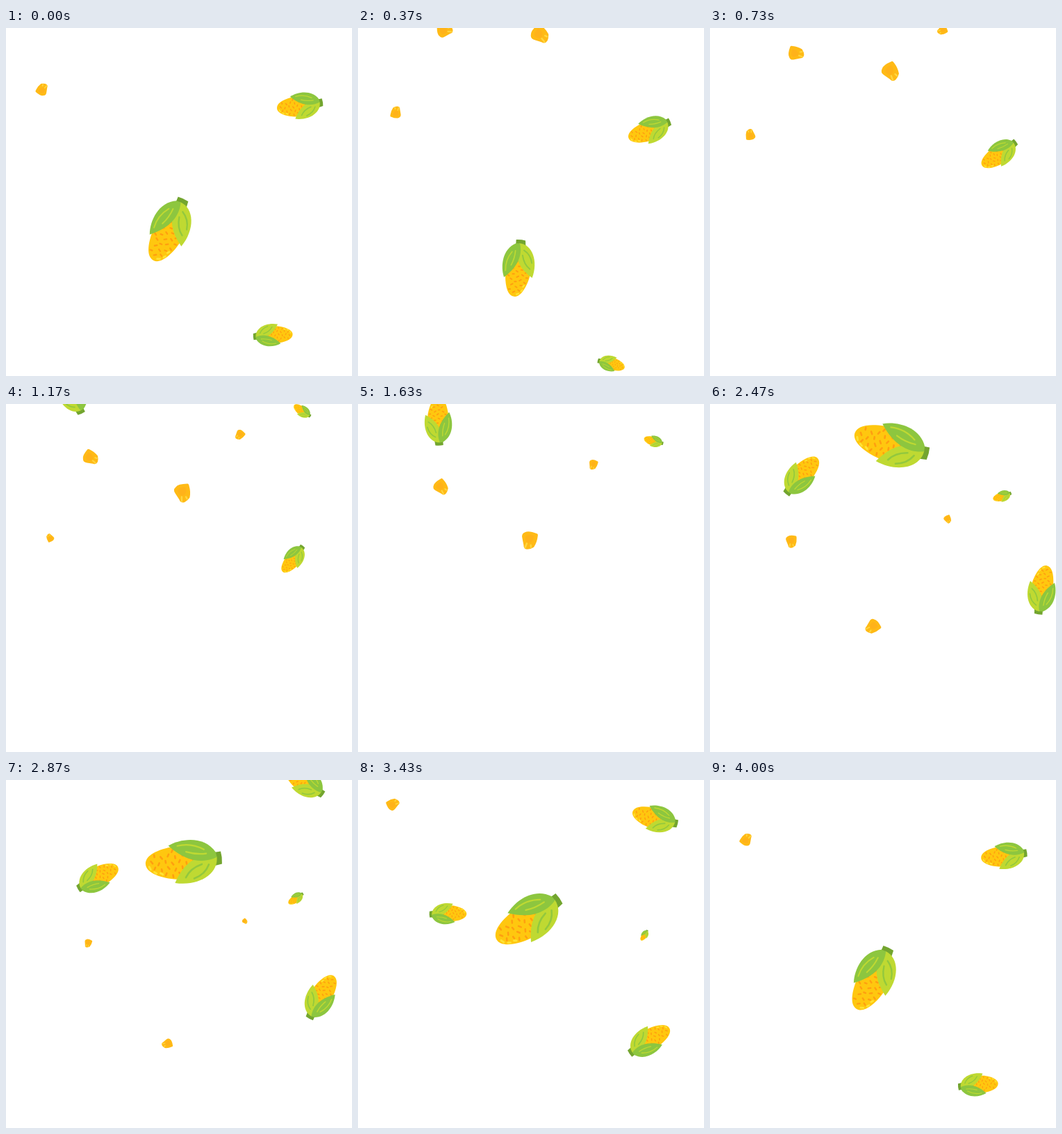
Write an HTML page with a canvas that moves like this. It is 498 by 500 pixels and loops after 4.03 s.

```html
<!DOCTYPE html>
<html>
<head>
<meta charset="utf-8">
<style>
html, body { margin: 0; width: 100%; height: 100%; overflow: hidden; background: #fff; }
canvas { display: block; }
</style>
</head>
<body>
<canvas id="stage" width="498" height="500"></canvas>
<script>
const ctx = document.getElementById('stage').getContext('2d');
const LOOP = 4030, LIFE = 2640;

// end: time it vanishes; y: height there; v: fall in px/ms;
// x: cubic Bezier drift; turn: angle at the end; spin: degrees/ms
const corns = [
  { end: 4735, y: 395, v: .149, x: [263, 263, 228, 229], size: 110, turn: -98, spin: -.051 },
  { end: 4470, y: 490.3, v: .1117, x: [516, 466, 405, 361], size: 71, turn: 200, spin: .049 },
  { end: 3560, y: 235.3, v: .0943, x: [426, 428, 419, 411], size: 28.5, turn: -61, spin: -.0405 },
  { end: 5460, y: 247.4, v: .0949, x: [429, 430, 415, 412], size: 67, turn: -60, spin: -.038 },
  { end: 3810, y: 227.5, v: .093, x: [94, 147, 130, 128], size: 69.5, turn: 200, spin: .05 }
];
const kernels = [
  { end: 5380, y: 208, v: .0888, x: [51, 49, 53, 66], size: 17, turn: -125, spin: -.05 },
  { end: 2910, y: 238.2, v: .0924, x: [125, 125, 113, 118], size: 21, turn: 112, spin: .046 },
  { end: 2960, y: 391.8, v: .1474, x: [262, 262, 229, 232], size: 24.5, turn: 168, spin: .049 },
  { end: 2920, y: 207.7, v: .0935, x: [332, 336, 340, 344], size: 13.5, turn: 45, spin: -.05 }
];

const cob = new Path2D('M-55 1C-55-10-42-18-17-22L18-14L18 2L-11 25C-32 23-55 14-55 1Z');
const lightHusk = new Path2D('M48-5C50 20 20 37-14 30C-6 14 4 2 20-5Z');
const darkHusk = new Path2D('M-21-24C-2-34 32-36 47-11L48-4C30 4 5 2-21-24Z');
const stalk = new Path2D('M44-11L54-12Q56-3 55 6L45 8Z');
const darkVeins = new Path2D('M-8-23Q12-27 30-16M4-14Q18-9 33-10');
const lightVeins = new Path2D('M2 23Q9 10 26 5M14 25Q30 20 36 6');
const shine = new Path2D('M-50 5L-48 9M-43 13L-40 15M-34 15L-31 17');
const seeds = new Path2D();
for (let i = 0; i < 7; i++) {
  for (let j = 0; j < 5; j++) {
    const x = -46 + i * 10 + j % 2 * 4, y = -19 + j * 9 + i % 2 * 3;
    const limit = 9 + (x + 50) * .4;
    if (Math.abs(y) > Math.min(limit, 20)) continue;
    const lean = (i + j) % 3 - .8;
    seeds.moveTo(x - lean, y - 1.6);
    seeds.lineTo(x + lean, y + 1.6);
  }
}

const grain = new Path2D('M-12-9Q-14 4-10 8Q-7 13-1 10L8 6Q14 5 13-1Q12-5 8-9Q0-12-8-11Q-12-11-12-9Z');
const grainCore = new Path2D('M-8-5Q-9 4-4 6Q3 5 4 0Q0-8-8-5Z');
const grainShine = new Path2D('M5 2L11 3M6-4L9-5');

function fill(path, color) {
  ctx.fillStyle = color;
  ctx.fill(path);
}

function stroke(path, color, width) {
  ctx.strokeStyle = color;
  ctx.lineWidth = width;
  ctx.stroke(path);
}

function drawCorn() {
  fill(cob, '#ffc70f');
  stroke(seeds, '#ff9f10', 2.6);
  stroke(shine, '#ffe234', 3);
  fill(stalk, '#73a52f');
  fill(lightHusk, '#bfd932');
  stroke(lightVeins, '#92c83e', 2.6);
  fill(darkHusk, '#8dc63f');
  stroke(darkVeins, '#bfd932', 2.2);
}

function drawKernel() {
  fill(grain, '#ffba16');
  fill(grainCore, '#ffb21a');
  stroke(grainShine, '#ffd640', 2.4);
}

function bezier([a, b, c, d], p) {
  const q = 1 - p;
  return q * q * q * a + 3 * p * q * q * b + 3 * p * p * q * c + p * p * p * d;
}

function place(item, t, unit, draw) {
  const left = (item.end - t + 2 * LOOP) % LOOP;
  const p = 1 - left / LIFE;
  const shrink = 1 - .5 * Math.max(0, p) ** 5;
  const scale = item.size / unit * shrink;
  ctx.save();
  ctx.translate(bezier(item.x, p), item.y - item.v * left);
  ctx.rotate((item.turn - item.spin * left) * Math.PI / 180);
  ctx.scale(scale, scale);
  draw();
  ctx.restore();
}

function frame(now) {
  const t = now % LOOP;
  ctx.clearRect(0, 0, 498, 500);
  ctx.lineCap = 'round';
  for (const c of corns) place(c, t, 110, drawCorn);
  for (const k of kernels) place(k, t, 24, drawKernel);
  requestAnimationFrame(frame);
}
requestAnimationFrame(frame);
</script>
</body>
</html>
```
